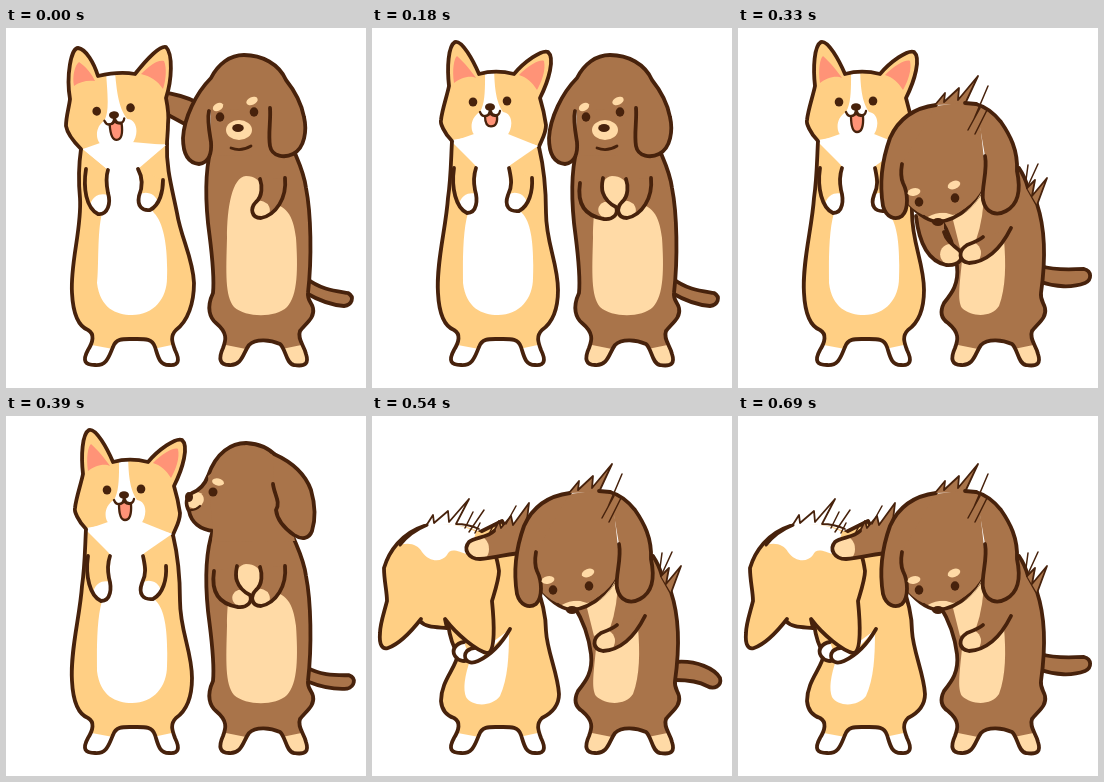
Animation of 360 by 360 pixels, one loop 720 ms. Source, as an HTML page with a canvas:

```html
<!DOCTYPE html>
<html lang="en">
<head>
<meta charset="utf-8">
<title>Two dogs bowing</title>
<style>
html, body { margin: 0; width: 100%; height: 100%; overflow: hidden; background: #fff; }
canvas { display: block; width: 360px; height: 360px; }
</style>
</head>
<body>
<canvas id="stage" width="360" height="360"></canvas>
<script>
const ctx = document.getElementById('stage').getContext('2d');
const INK = '#47220c', TAN = '#ffcf84', PINK = '#ff9377', BROWN = '#a9744a', CREAM = '#ffdaa6', WHITE = '#fff';
const STEP = 30, STEPS = 24;

const fill = (d, color) => { ctx.fillStyle = color; ctx.fill(new Path2D(d)); };
const line = (d, width = 3.8) => { ctx.lineWidth = width; ctx.stroke(new Path2D(d)); };

// Filled shape, optional markings clipped to it, then its outline.
function part(d, color, markings, width) {
  fill(d, color);
  if (markings) {
    ctx.save();
    ctx.clip(new Path2D(d));
    markings();
    ctx.restore();
  }
  line(d, width);
}

function oval(x, y, rx, ry, color = INK, tilt = 0) {
  ctx.fillStyle = color;
  ctx.beginPath();
  ctx.ellipse(x, y, rx, ry, tilt, 0, 7);
  ctx.fill();
}

function turned(x, y, degrees, draw, dx = 0, dy = 0) {
  ctx.save();
  ctx.translate(x + dx, y + dy);
  ctx.rotate(degrees * Math.PI / 180);
  ctx.translate(-x, -y);
  draw();
  ctx.restore();
}

// Blend two paths that share the same commands.
function mix(a, b, k) {
  const number = /-?[\d.]+/g, ends = b.match(number);
  let i = 0;
  return a.replace(number, v => +v + (ends[i++] - v) * k);
}

const toes = color => fill('M75 315L107 321 125 330 147 321 175 315H210L240 321 258 330 276 321 305 315V345H75Z', color);

const CORGI_FEET = 'C89 306 87 314 82 322C76 333 79 337 89 337C101 338 103 328 107 319C110 310 118 311 127 311' +
  'C138 311 146 310 149 319C152 328 153 337 163 337C173 338 174 332 169 322C166 314 164 308 170 302';
const DOG_FEET = 'C222 305 220 312 217 320C212 331 214 337 223 337C236 338 237 325 243 317C250 310 265 312 274 316' +
  'C280 321 280 336 288 337C300 339 303 335 300 326C298 317 291 311 294 303';

function corgiStanding(lean, mouth) {
  const body = mix(
    'M80 113C79 130 79 150 76 170C74 200 64 235 66 265C67 285 72 298 82 302' + CORGI_FEET +
    'C180 295 186 282 186 262C186 235 174 215 174 185C174 160 172 140 167 119',
    'M75 121C73 135 72 150 74 170C76 200 64 235 66 265C67 285 72 298 82 302' + CORGI_FEET +
    'C182 293 188 275 188 255C187 230 175 210 171 185C166 160 160 140 161 116', lean);
  part(body, TAN, () => {
    fill(mix(
      'M78 112L104 138C105 150 103 165 96 185C90 205 91 240 91 255C94 280 110 287 126 287C148 287 161 270 161 250C162 220 160 195 150 185C137 170 136 155 137 138L168 112Z',
      'M73 118L101 141C103 150 101 165 96 185C91 205 93 240 91 255C94 280 110 287 126 287C148 287 161 270 161 250C162 220 158 195 148 185C137 170 133 155 132 140L163 114Z', lean), WHITE);
    toes(WHITE);
  });

  const head = mix(
    'M80 113C72 105 68 95 69 92C70 82 75 68 77 58C75 40 76 18 83 14C90 12 101 32 107 46C118 43 130 43 142 46C152 34 170 21 176 24C183 30 177 52 168 70C171 80 173 90 174 97C174 106 169 113 167 119',
    'M75 121C66 112 61 104 60 98C60 88 63 80 64 71C60 48 65 20 72 20C80 21 88 35 92 48C105 45 118 44 129 46C140 32 154 17 160 19C167 26 166 52 160 70C162 80 163 88 162 96C162 105 161 110 161 116', lean);
  const onFace = draw => turned(118, 79, -4 * lean, draw, -10 * lean, 8 * lean);
  part(head, TAN, () => {
    onFace(() => fill('M113 30H122C122 60 124 74 131 84C141 85 142 100 134 109L167 118V130H80V112L104 108C98 105 97 90 108 84C114 74 113 58 113 30', WHITE));
    fill(mix('M82 55C80 42 82 30 85 28C92 34 100 44 104 50C98 47 88 50 82 55',
      'M68 58C66 48 69 37 73 34C80 39 86 46 89 53C81 52 73 54 68 58', lean), PINK);
    fill(mix('M147 47C157 37 168 31 172 33C174 42 170 53 165 62C160 54 154 49 147 47',
      'M135 46C143 38 152 31 158 33C161 40 160 52 157 61C152 53 144 48 135 46', lean), PINK);
  });
  fill(mix('M82 113L104 138 137 138 166 118 136 106 102 106Z',
    'M77 121L101 141 132 141 160 117 126 114 94 115Z', lean), WHITE);
  onFace(() => {
    oval(101, 74, 4.3, 4.5);
    oval(135, 73, 4.3, 4.5);
    const tip = 88 + 16 * mouth;
    part(`M113 88Q113 ${tip} 119 ${tip}Q126 ${tip} 125 88Q120 88 118 85Q117 88 113 88`, PINK, null, 2.3);
    line('M108 84Q110 89 114 88Q118 87 118 80Q119 87 123 87Q127 88 128 83', 2.3);
    oval(118, 79, 5, 3.8);
  });

  part(mix('M82 140C79 160 84 180 95 185C105 185 106 172 103 162C101 152 102 146 104 140',
    'M80 141C77 160 80 180 92 186C102 187 105 175 102 165C100 155 100 148 102 142', lean), TAN,
    () => oval(99 - 3 * lean, 178 + lean, 12, 13, WHITE, 0.5));
  part(mix('M137 140C139 150 141 157 136 167C132 178 137 184 147 183C157 178 161 163 160 150',
    'M132 141C137 150 137 158 133 168C131 178 136 183 144 182C154 177 157 163 157 152', lean), TAN,
    () => oval(142 - 3 * lean, 177, 13, 12, WHITE, -0.5));
}

function corgiBowing() {
  part('M76 208C78 222 81 231 86 238C84 252 69 265 69 285C70 296 76 300 82 302' + CORGI_FEET +
    'C180 297 187 290 187 278C186 258 175 235 174 215C174 195 168 178 163 165L130 105 100 120', TAN, () => {
    fill('M99 242C92 260 91 274 94 281C100 291 120 291 128 280C136 262 137 240 137 214Z', WHITE);
    toes(WHITE);
  });
  part('M92 226C84 227 79 234 83 240C87 246 94 246 98 243', WHITE);
  part('M138 213C130 227 119 239 106 245C95 250 90 241 95 235C102 229 110 233 116 236', TAN,
    () => oval(100, 240, 12, 12, WHITE));

  fill('M50 112C70 106 105 107 118 125L123 140 127 155 90 190Z', TAN);
  const head = 'M52 110C30 117 17 135 12 152C12 165 15 175 15 185C12 197 8 208 8 217C7 228 10 234 16 232C30 227 42 212 49 203' +
    'L48 205C54 212 65 211 75 212L73 203C85 219 105 235 115 237C124 237 122 205 120 185C123 175 127 163 127 155C126 148 125 143 123 138';
  part(head, TAN);
  fill('M28 129C38 126 46 129 50 136C58 147 70 146 75 139C78 132 84 134 97 139L104 116C88 107 66 107 52 110Q38 116 28 129', WHITE);
  line('M28 129Q38 116 55 109', 3);
  line('M54 110L61 99 62 107 76 95 77 106 97 83 84 108Q96 108 107 113', 1.8);
  line('M101 96L93 112M112 94L97 116M108 107L103 117', 1.5);
}

function tail(bow, angle) {
  if (bow) {
    part(mix('M303 246C325 244 343 253 348 262C350 270 342 274 335 270C328 266 315 264 303 264',
      'M303 238C318 243 334 241 346 241C354 243 354 252 347 255C334 260 317 259 303 254', (12 - angle) / 18), BROWN);
  } else {
    turned(304, 255, angle - 20, () =>
      part('M300 250C315 262 330 263 342 265C349 269 346 277 338 278C325 277 312 272 300 265', BROWN));
  }
}

function dogStanding(pose) {
  part('M207 114C198 140 200 175 202 195C205 220 209 245 207 265C200 280 204 290 210 295' + DOG_FEET +
    'C300 295 309 290 307 280C306 275 301 272 302 265C306 230 305 185 300 160C298 145 293 135 288 123', BROWN, () => {
    fill('M240 148C226 149 221 180 221 210C220 245 219 268 228 279C240 290 270 290 281 279C292 268 292 240 290 210C287 185 280 178 262 174C257 166 258 148 240 148', CREAM);
    toes(CREAM);
  });
  if (pose !== 'release') {
    part('M208 155C205 175 212 188 232 191C241 192 247 186 244 179C238 176 233 171 231 165C229 160 230 155 231 150', BROWN,
      () => oval(237, 183, 11, 9, CREAM, 0.4));
  }
  part('M279 150C281 170 270 187 255 190C245 190 244 180 250 174C257 168 256 157 254 151', BROWN,
    () => oval(253, 183, 11, 10, CREAM, -0.4));

  if (pose === 'look') {
    part('M208 115C194 114 185 106 183 95C179 88 180 81 186 77C194 74 199 68 202 60C210 36 226 27 240 27C255 28 264 33 270 40', BROWN,
      () => oval(189, 84, 9, 8, CREAM, -0.5));
    fill('M207 115L202 60 240 29 270 40 289 125 206 126Z', BROWN);
    part('M268 38C288 47 300 60 305 74C309 88 310 102 306 115C303 123 296 124 288 119C278 112 271 103 270 94C275 86 268 78 267 68', BROWN);
    oval(183, 81, 4, 5);
    oval(207, 76, 4.5, 4.5);
    oval(212, 66, 6, 3.5, CREAM, 0.2);
    line('M185 94Q190 94 194 90', 2.3);
    return;
  }
  fill('M205 50Q238 10 280 52L289 127 204 128Z', BROWN);
  part('M264 80C265 92 262 106 264 118C266 129 279 130 287 126C299 120 301 102 298 89C295 73 288 62 280 52C273 36 256 27 238 27' +
    'C224 27 212 36 205 50C190 65 178 90 177 110C177 125 182 135 193 136C203 135 206 125 205 114C203 102 201 92 203 83', BROWN);
  oval(214, 89, 4.3, 4.7);
  oval(248, 84, 4.3, 4.7);
  oval(212, 79, 5.5, 3.7, CREAM, -0.5);
  oval(246, 73, 6, 3.8, CREAM, -0.4);
  oval(233, 102, 13, 10, CREAM);
  oval(232, 100, 5.8, 4);
  line('M225 120Q235 124 245 118', 2.8);
}

function dogBowing(pushing) {
  part('M202 190C212 206 217 222 219 238C221 256 214 265 206 275C201 285 204 291 210 295' + DOG_FEET +
    'C300 295 309 290 307 280C306 275 302 272 303 265C308 230 307 200 299 176L290 160Q287 149 281 140', BROWN, () => {
    fill('M224 232C222 255 219 272 224 280C235 290 254 289 261 278C268 260 268 235 266 212Z', CREAM);
    fill('M214 188L222 220 238 212Q246 190 246 160Z', CREAM);
    toes(CREAM);
  });
  part('M289 160L297 152 294 168 309 150 299 177', BROWN, null, 1.8);
  line('M300 136L289 160M290 137L288 152', 1.5);
  if (pushing) {
    part('M150 137C140 137 123 142 108 143C96 143 91 133 97 126C103 121 115 122 122 115L127 105 129 112 139 100 141 109 157 87 154 112', BROWN,
      () => oval(104, 133, 13, 14, CREAM), 1.8);
    line('M150 137C140 137 123 142 108 143C96 143 91 133 97 126C103 121 115 122 122 115');
    line('M122 108L118 116M144 90L134 108', 1.5);
  } else {
    fill('M176 178L206 188V206L190 215Z', BROWN);
    part('M178 188C181 215 190 233 208 237C222 238 226 230 222 223C215 217 208 212 206 204', BROWN,
      () => oval(214, 227, 12, 11, CREAM, 0.4));
  }
  part('M273 200C262 222 248 234 231 235C220 233 220 223 229 217C237 214 242 212 245 209', BROWN,
    () => oval(230, 225, 13, 12, CREAM));

  part('M165 168C178 186 190 193 200 194C220 192 242 175 248 150', BROWN,
    () => oval(203, 196, 20, 11, CREAM, -0.15));
  fill('M165 170Q174 182 185 187Q200 181 215 187Q243 174 248 150L240 76 196 78 158 130Z', BROWN);
  fill('M226 185Q242 175 247 155Q242 173 226 185', CREAM);
  const rightSide = 'M247 128C250 143 243 160 245 172C248 186 259 188 268 183C283 175 282 157 279 143C280 122 272 107 263 94Q252 80 238 76';
  const leftSide = 'M198 77C175 80 160 92 152 110C143 135 142 160 145 178C148 189 157 193 164 188C171 181 170 165 165 155C162 148 163 142 164 136';
  for (const side of [rightSide, leftSide]) part(side, BROWN);
  part('M197 77L207 65 206 74 221 60 220 72 240 48 227 76', BROWN, null, 1.8);
  fill('M199 78L227 74 238 78V84H199Z', BROWN);
  line('M227 75L238 76');
  line('M250 58L236 91M242 80L230 102M249 82L237 106', 1.5);
  oval(181, 174, 4.3, 4.7);
  oval(217, 170, 4.3, 4.7);
  oval(176, 164, 6.5, 3.8, CREAM, -0.2);
  oval(216, 157, 6.5, 4, CREAM, -0.35);
  oval(200, 194, 6, 4);
}

// [step, tail angle]
const WAG = [[0, 20], [3, 12], [6, 20], [11, -6], [15, 29], [18, 12], [23, -6], [24, 20]];
// [first step, pose]
const POSES = [[0, 'release'], [2, 'bow'], [5, 'stand'], [9, 'bow'], [13, 'look'], [17, 'push']];

function wagAngle(step) {
  const i = WAG.findIndex(([at]) => at > step);
  const [from, a] = WAG[i - 1], [to, b] = WAG[i];
  return a + (b - a) * (step - from) / (to - from);
}

function draw(now) {
  const step = Math.floor(now / STEP) % STEPS;
  const pose = POSES.filter(([at]) => at <= step).pop()[1];
  const bowing = pose === 'bow' || pose === 'push';
  ctx.fillStyle = WHITE;
  ctx.fillRect(0, 0, 360, 360);
  ctx.strokeStyle = INK;
  ctx.lineCap = ctx.lineJoin = 'round';

  if (pose === 'release') part('M155 64C170 66 180 69 190 74L190 102C182 98 172 92 160 86', BROWN);
  if (pose === 'push') corgiBowing();
  else corgiStanding(Math.max(0, 1 - step / 2), pose === 'stand' ? 0.65 : 1);
  tail(bowing, wagAngle(step));
  if (bowing) dogBowing(pose === 'push');
  else dogStanding(pose);
}

const start = performance.now();
function loop() {
  draw(performance.now() - start);
  requestAnimationFrame(loop);
}
loop();
</script>
</body>
</html>
```
